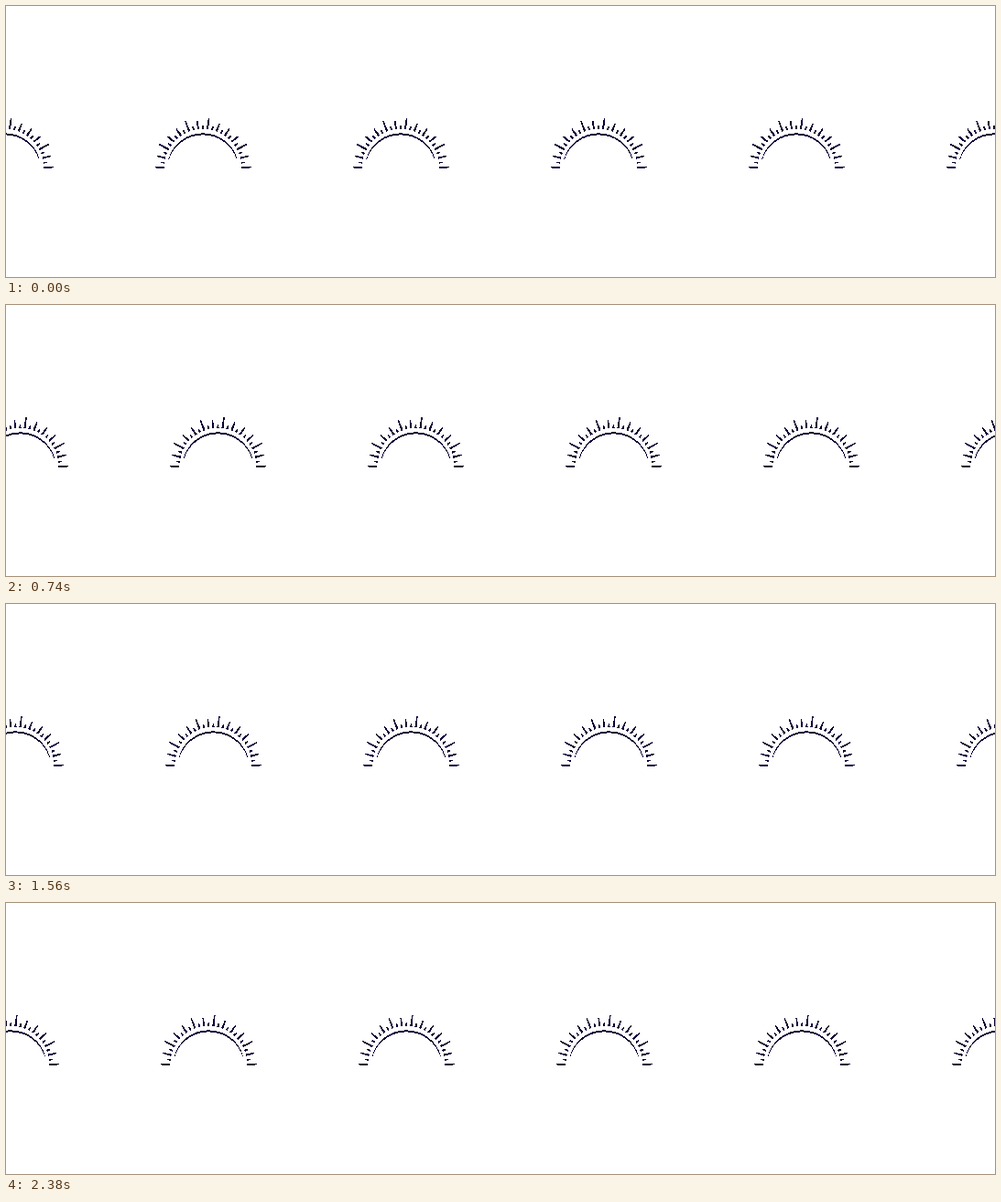
These frames come from a looping animation (1080 px wide and 297 px high, 2400 ms). An HTML page:

```html
<!DOCTYPE html>
<html lang="en">
<head>
<meta charset="utf-8">
<title>Passing suns</title>
<style>
  html, body { margin: 0; width: 100%; height: 100%; overflow: hidden; background: #fff; }
  svg { display: block; width: 1080px; height: 297px; }
  /* A custom property keeps the move out of the compositor, so edges are redrawn sharp. */
  @property --shift { syntax: "<length>"; inherits: false; initial-value: 0px; }
  #row {
    fill: #0a0033;
    shape-rendering: crispEdges;
    transform: translateX(var(--shift));
    animation: slide 2400ms steps(120) infinite;
  }
  @keyframes slide { from { --shift: 0px; } to { --shift: -647.04px; } }
</style>
</head>
<body>
<svg viewBox="0 0 1080 297">
  <defs>
    <g id="sun">
      <path d="M-37.6 -9A39.09 39.09 0 0 1 37.6 -9H36.9A38.99 38.99 0 0 0 -36.9 -9Z"/>
    </g>
  </defs>
  <g id="row"></g>
</svg>
<script>
  const NS = "http://www.w3.org/2000/svg";
  const GAP = 216, COPIES = 9, RAYS = 13;
  const sun = document.getElementById("sun");
  const row = document.getElementById("row");

  function add(parent, tag, attrs) {
    const el = document.createElementNS(NS, tag);
    for (const key in attrs) el.setAttribute(key, attrs[key]);
    parent.append(el);
  }

  // A wedge pointing away from the centre, wider at its base.
  function ray(angle, tip) {
    add(sun, "path", {
      d: `M42 -1.15L${tip} -.7V.7L42 1.15Z`,
      transform: `rotate(${-angle})`
    });
  }

  const long = [2, 6, 8, 11];
  for (let i = 0; i <= RAYS; i++) {
    const angle = i * 180 / RAYS;
    ray(angle, long.includes(i) ? 54.3 : i % RAYS ? 51.5 : 52.5);
    if (i < RAYS) ray(angle + 90 / RAYS, 46);
  }

  for (let i = 0; i < COPIES; i++) {
    add(row, "use", { href: "#sun", x: i * GAP - 1, y: 176.75 });
  }
</script>
</body>
</html>
```
